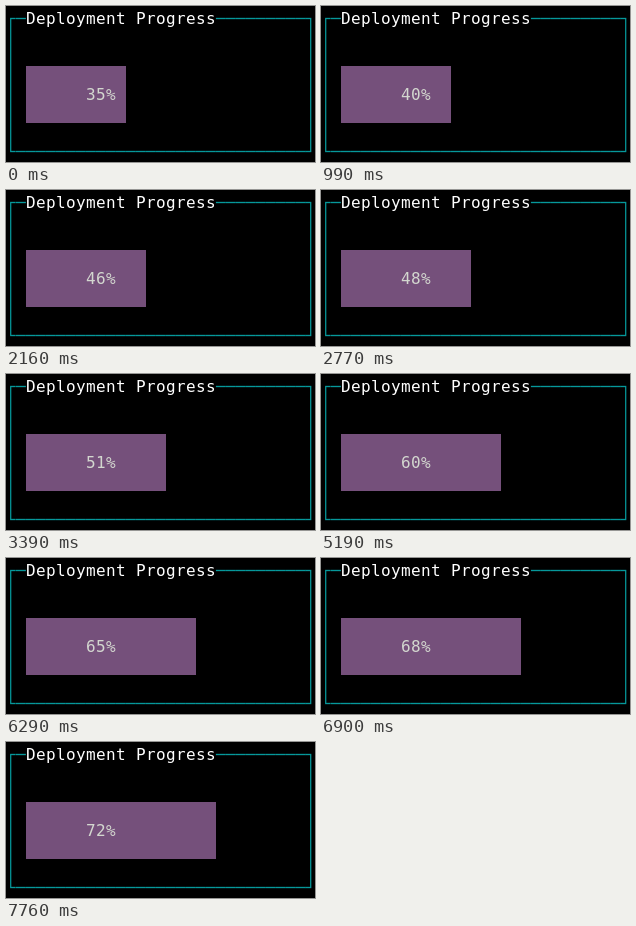
An HTML page that plays this animation: 309 px wide and 156 px high, repeating every 8000 ms.

```html
<!DOCTYPE html>
<html lang="en">
<head>
<meta charset="utf-8">
<title>Deployment Progress</title>
<style>
  html, body { margin: 0; width: 100%; height: 100%; overflow: hidden; background: #000; }
  body {
    position: relative;
    font: 16px/19px "DejaVu Sans Mono", monospace;
    letter-spacing: calc(10px - 1ch);
    white-space: pre;
  }
  div { position: absolute; }
  .panel { left: 0; top: 3px; color: #06989a; }
  .title { color: #fff; }
  .bar { left: 20px; top: 60px; width: 100px; height: 57px; background: #75507b; }
  .label { left: 80px; top: 79px; color: #d3d7cf; }
</style>
</head>
<body>
<div class="panel">┌─<span class="title">Deployment Progress</span>─────────┐
│                             │
│                             │
│                             │
│                             │
│                             │
│                             │
└─────────────────────────────┘</div>
<div class="bar"></div>
<div class="label">35%</div>
<script>
  const LOOP = 8000;           // ms
  const FROM = 35.75;          // percent at the start of the loop
  const RATE = 4.77 / 1000;    // percent per ms
  const CELL = 10, CELLS = 26; // bar grows in whole character cells

  const bar = document.querySelector(".bar");
  const label = document.querySelector(".label");
  const start = performance.now();

  function draw() {
    const t = (performance.now() - start) % LOOP;
    const percent = Math.floor(FROM + RATE * t);
    label.textContent = percent + "%";
    bar.style.width = Math.ceil(percent * CELLS / 100) * CELL + "px";
    requestAnimationFrame(draw);
  }
  draw();
</script>
</body>
</html>
```
